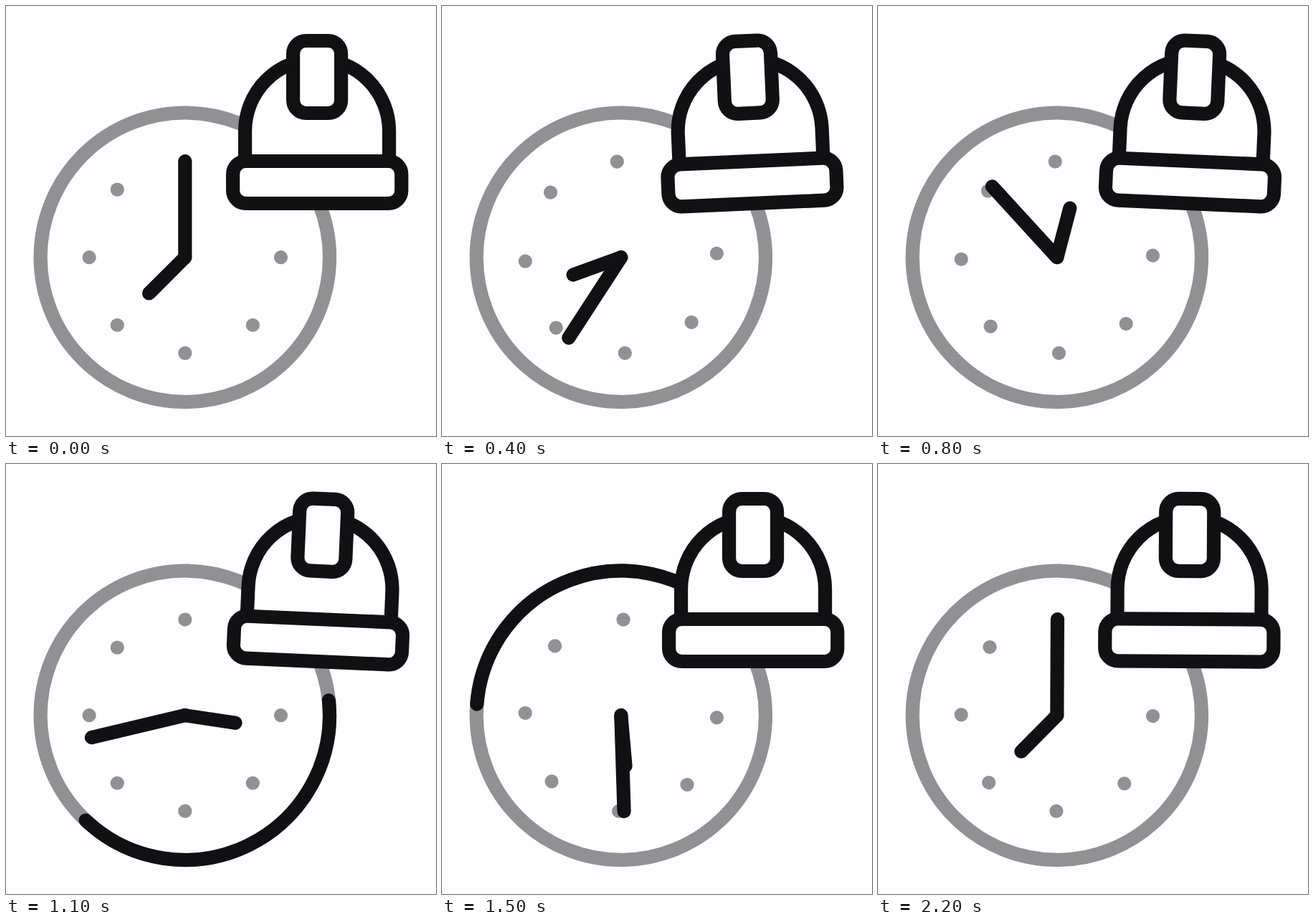
Write an HTML page that moves like this. It is 600 px wide and 600 px high and loops after 2300 ms.

```html
<!DOCTYPE html>
<html lang="en">
<head>
<meta charset="utf-8">
<title>Working hours</title>
<style>
  html, body { margin: 0; height: 100%; overflow: hidden; background: #fefdff; }
  svg { display: block; width: 100%; height: 100%; }
  .line { fill: none; stroke: #111013; stroke-width: 19.2; stroke-linecap: round; stroke-linejoin: round; }
  .solid { fill: #fefdff; }
  .ring { stroke: #929093; }
  #dots { fill: #929093; }
</style>
</head>
<body>
<svg viewBox="0 0 600 600">
  <g transform="translate(249.8 350.7)">
    <circle class="line ring" r="201.7"/>
    <path class="line" id="arc"/>
    <g id="dial">
      <g id="dots"></g>
      <path class="line" id="minute" d="M0 0V-134"/>
      <path class="line" id="hour" d="M0 0V-71"/>
    </g>
  </g>
  <g id="hat">
    <path class="line solid" d="M333.6 216.5V174.5a100.5 100.5 0 0 1 201 0V216.5"/>
    <rect class="line solid" x="400.6" y="48.5" width="67" height="101" rx="18"/>
    <rect class="line solid" x="316.6" y="216.5" width="235.2" height="59" rx="18"/>
  </g>
</svg>
<script>
const LOOP = 2300, STEP = 100, RADIUS = 201.7;
const $ = id => document.getElementById(id);

const progress = (t, start, length) => Math.min(1, Math.max(0, (t - start) / length));

// Cubic-bezier(x1, 0, x2, 1); the default handles give a plain smoothstep
function ease(t, start, length, x1 = 1 / 3, x2 = 2 / 3) {
  const p = progress(t, start, length);
  let lo = 0, hi = 1, u;
  for (let i = 0; i < 24; i++) {
    u = (lo + hi) / 2;
    const x = 3 * u * (1 - u) * ((1 - u) * x1 + u * x2) + u ** 3;
    if (x < p) lo = u; else hi = u;
  }
  return u * u * (3 - 2 * u);
}

// Out and back again
const pulse = (t, start, length) => Math.sin(Math.PI * progress(t, start, length)) ** 2;

function point(deg, r) {
  const a = deg * Math.PI / 180;
  return [r * Math.sin(a), -r * Math.cos(a)];
}

function arcPath(from, to) {
  if (to - from < 0.5) return "";
  const large = to - from > 180 ? 1 : 0;
  return `M${point(from, RADIUS)}A${RADIUS} ${RADIUS} 0 ${large} 1 ${point(to, RADIUS)}`;
}

const rotate = (id, deg, pivot = "0 0") => $(id).setAttribute("transform", `rotate(${deg} ${pivot})`);

for (let i = 0; i < 8; i++) {
  const [x, y] = point(i * 45, 133.7);
  $("dots").innerHTML += `<circle cx="${x}" cy="${y}" r="9.6"/>`;
}

function draw(now) {
  const t = Math.floor(now % LOOP / STEP) * STEP;
  rotate("minute", 4 * 360 * ease(t, 90, 2130, 0.175, 0.428));
  rotate("hour", 225 + 360 * ease(t, 200, 2100, 0.184, 0.368));
  rotate("dial", 4 * pulse(t, 1300, 1000) - 2.66 * pulse(t, 0, 1030));

  // The hat tips left, then right, settles, and nods once more
  const tilt = 2 * ease(t, 400, 400) - ease(t, 0, 400) - ease(t, 1100, 200);
  rotate("hat", 2.5 * tilt + 0.9 * pulse(t, 1800, 500), "434 275");

  // The sweep starts and ends behind the hat
  const tail = 45 + 360 * ease(t, 889, 1031), head = 45 + 360 * ease(t, 762, 680);
  $("arc").setAttribute("d", arcPath(tail, head));
}

let begin;
function tick(now) {
  begin ??= now;
  draw(now - begin);
  requestAnimationFrame(tick);
}
draw(0);
requestAnimationFrame(tick);
</script>
</body>
</html>
```
